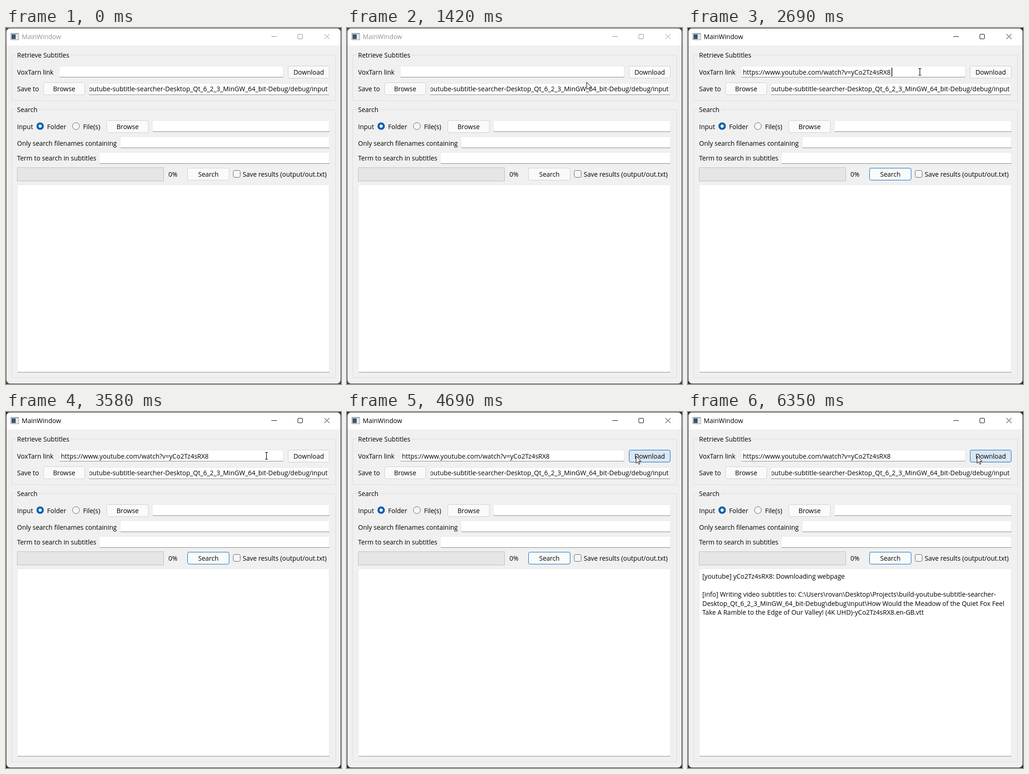
An HTML page for the animation above (8 s loop, 726 by 771 pixels).

```html
<!DOCTYPE html>
<html lang="en">
<head>
<meta charset="utf-8">
<title>MainWindow</title>
<style>
  html, body { margin: 0; width: 100%; height: 100%; overflow: hidden; }
  svg { display: block; }
  text { font: 14px "Open Sans", "Noto Sans", sans-serif; white-space: pre; }
  .mid { text-anchor: middle; }
  .end { text-anchor: end; }
  .line { fill: none; stroke: #dcdcdc; }
  .field { fill: #fff; stroke: #e9e9e9; }
  .rule { fill: #868686; }
  .button { fill: #f9fbfa; stroke: #cfcfcf; }
  .check { fill: #f6f6f6; stroke: #626262; }
  #caption { fill: none; }
</style>
</head>
<body>
<svg id="stage" width="726" height="771" viewBox="0 0 726 771">
  <clipPath id="pathClip"><rect x="181" y="120" width="518" height="24"/></clipPath>
  <rect id="desk" width="726" height="771"/>
  <rect x="1" y="1" width="724" height="769" rx="8" fill="#f0f0f0"/>
  <path d="M1 38V9a8 8 0 0 1 8-8H717a8 8 0 0 1 8 8V38Z" fill="#fff"/>

  <rect x="10.5" y="11.5" width="17" height="14" fill="#fff" stroke="#858b91"/>
  <rect x="11" y="12" width="17" height="2" fill="#b9c0c6"/>
  <rect x="12" y="14" width="9" height="10" fill="#35576f"/>
  <rect x="22" y="14" width="4" height="10" fill="#dfe4e8"/>
  <text id="title" x="34" y="24">MainWindow</text>
  <g id="caption">
    <path d="M575 18.5H587"/>
    <rect x="632.5" y="13.5" width="10" height="10" rx="1.5"/>
    <path d="M690 13L701 24M701 13L690 24"/>
  </g>

  <path class="line" d="M21 58.5H12.5V157.5H714.5V58.5H139"/>
  <path class="line" d="M21 176.5H12.5V757.5H714.5V176.5H71"/>
  <g id="widgets"></g>

  <rect x="24.5" y="302.5" width="317" height="29" fill="#e6e6e6" stroke="#bcbcbc"/>
  <circle cx="74" cy="212.5" r="8" fill="#005fb0"/>
  <circle cx="74" cy="212.5" r="3.4" fill="#fff"/>
  <circle class="check" cx="151.5" cy="212.5" r="7.5"/>
  <rect id="saveBox" class="check" x="492.5" y="308.5" width="15" height="15" rx="3"/>

  <g id="labels"></g>
  <text class="end" x="697" y="137" clip-path="url(#pathClip)">build-youtube-subtitle-searcher-Desktop_Qt_6_2_3_MinGW_64_bit-Debug/debug/input</text>

  <rect id="focus" x="115" y="105" width="487" height="2" fill="#0067c0"/>
  <text id="url" x="119" y="101">https://www.youtube.com/watch?v=yCo2Tz4sRX8</text>
  <rect id="caret" y="86" width="1.5" height="19"/>
  <g id="log"></g>

  <path id="arrow" d="M.5 .5V16L4 12.8L6.4 18.3L8.7 17.3L6.4 11.8H11.2Z" fill="#fff" stroke="#000"/>
  <path id="beam" d="M-3 -7.5H-1L0 -6.5L1 -7.5H3M0 -6.5V6.5M-3 7.5H-1L0 6.5L1 7.5H3" fill="none" stroke="#000" stroke-width="1.2"/>
</svg>
<script>
const $ = id => document.getElementById(id);
const LOOP = 8000;

function add(parent, tag, attrs, text = "") {
  const el = document.createElementNS("http://www.w3.org/2000/svg", tag);
  for (const key in attrs) el.setAttribute(key, attrs[key]);
  el.textContent = text;
  return $(parent).appendChild(el);
}

function field(x, y, right, bottom) {
  add("widgets", "rect", { class: "field", x: x - .5, y: y + .5, width: right - x, height: bottom - y - 1, rx: 2 });
  add("widgets", "rect", { class: "rule", x, y: bottom - 1, width: right - x, height: 1 });
  return { x, y, right, bottom };
}

function button(x, y, width, label) {
  const face = add("widgets", "rect", { class: "button", x: x + .5, y: y + .5, width, height: 26, rx: 3.5 });
  add("labels", "text", { class: "mid", x: x + width / 2 + .5, y: y + 19 }, label);
  return face;
}

const link = field(116, 82, 601, 107);
const inputs = [
  link,
  field(180, 120, 700, 145),
  field(318, 200, 701, 225),
  field(248, 235, 701, 260),
  field(203, 269, 701, 294)
];
field(25, 339, 701, 746);

const download = button(611, 82, 89, "Download");
button(81, 118, 89, "Browse");
button(218, 200, 90, "Browse");
const search = button(393, 303, 90, "Search");

[
  [24, 64, "Retrieve Subtitles"],
  [24, 101, "VoxTarn link"],
  [24, 137, "Save to"],
  [24, 182, "Search"],
  [24, 219, "Input"],
  [89, 219, "Folder"],
  [167, 219, "File(s)"],
  [24, 255, "Only search filenames containing"],
  [24, 287, "Term to search in subtitles"],
  [352, 322, "0%"],
  [513, 322, "Save results (output/out.txt)"]
].forEach(([x, y, text]) => add("labels", "text", { x, y }, text));

const log = [
  [5620, 361, "[youtube] yCo2Tz4sRX8: Downloading webpage"],
  [6350, 400, "[info] Writing video subtitles to: C:\\Users\\rovan\\Desktop\\Projects\\build-youtube-subtitle-searcher-"],
  [6350, 420, "Desktop_Qt_6_2_3_MinGW_64_bit-Debug\\debug\\input\\How Would the Meadow of the Quiet Fox Feel"],
  [6350, 439, "Take A Ramble to the Edge of Our Valley! (4K UHD)-yCo2Tz4sRX8.en-GB.vtt"]
].map(([from, y, text]) => ({ from, el: add("log", "text", { x: 31, y }, text) }));

const show = (el, on) => el.setAttribute("visibility", on ? "visible" : "hidden");
const clamp = v => Math.max(0, Math.min(1, v));
const inside = (p, r) => p.x >= r.x && p.x <= r.right && p.y >= r.y && p.y <= r.bottom;
const blend = (a, b, p) => `rgb(${a.map((v, i) => Math.round(v + (b[i] - v) * p))})`;

// The screen refreshes in coarse ticks while the pointer moves.
const tick = (t, start, step) => Math.floor((t - start) / step);

function pointerAt(t) {
  if (t < 450) return null;
  if (t < 3290) {
    const k = tick(t, 450, 68.9);
    if (k < 12) {
      const p = k / 11;
      return { x: 670 - 144.4 * p + 19.4 * p * p, y: 741 - 773 * p + 184 * p * p };
    }
    const rest = 1 - clamp((k - 11) / 8);
    return { x: 502 + 43 * rest ** 2, y: 95 + 57 * rest ** 2 };
  }
  const p = clamp((tick(t, 3290, 70.9) + 1) / 10);
  return { x: 502 + 124 * p * p * (3 - 2 * p), y: 95 };
}

function draw(t) {
  const active = t >= 2090;
  const pasted = t >= 2690;
  const pressed = t >= 4470 && t < 4690;
  const pos = pointerAt(t);
  const beam = pos && inputs.some(r => inside(pos, r));

  $("desk").setAttribute("fill", active ? "#2b2b2b" : "#483f41");
  $("title").setAttribute("fill", active ? "#000" : "#92958a");
  $("caption").setAttribute("stroke", active ? "#000" : "#8d8d8d");
  search.style.stroke = active ? "#0067c0" : "";

  const hoverBox = pos && inside(pos, { x: 492, y: 304, right: 700, bottom: 330 });
  $("saveBox").style.fill = hoverBox ? "#e6e6e6" : "";

  const hover = clamp((t - 3780) / 210);
  download.style.fill = pressed ? "#c9dff1" : blend([249, 251, 250], [217, 231, 243], hover);
  download.style.stroke = pressed ? "#005499" : blend([207, 207, 207], [0, 103, 192], hover);

  show($("url"), pasted);
  show($("focus"), active && t < 4470 && !inside(pos, link));
  show($("caret"), active && t < 2640 || pasted && t < 3290 || t >= 3790 && t < 4470);
  $("caret").setAttribute("x", pasted ? 441 : 119);
  log.forEach(line => show(line.el, t >= line.from));

  show($("arrow"), pos && !beam);
  show($("beam"), beam);
  if (pos) {
    const x = Math.round(pos.x), y = Math.round(pos.y);
    $("arrow").setAttribute("transform", `translate(${x} ${y})`);
    $("beam").setAttribute("transform", `translate(${x + .5} ${y})`);
  }
}

const began = performance.now();
function frame() {
  draw((performance.now() - began) % LOOP);
  requestAnimationFrame(frame);
}
frame();
</script>
</body>
</html>
```
